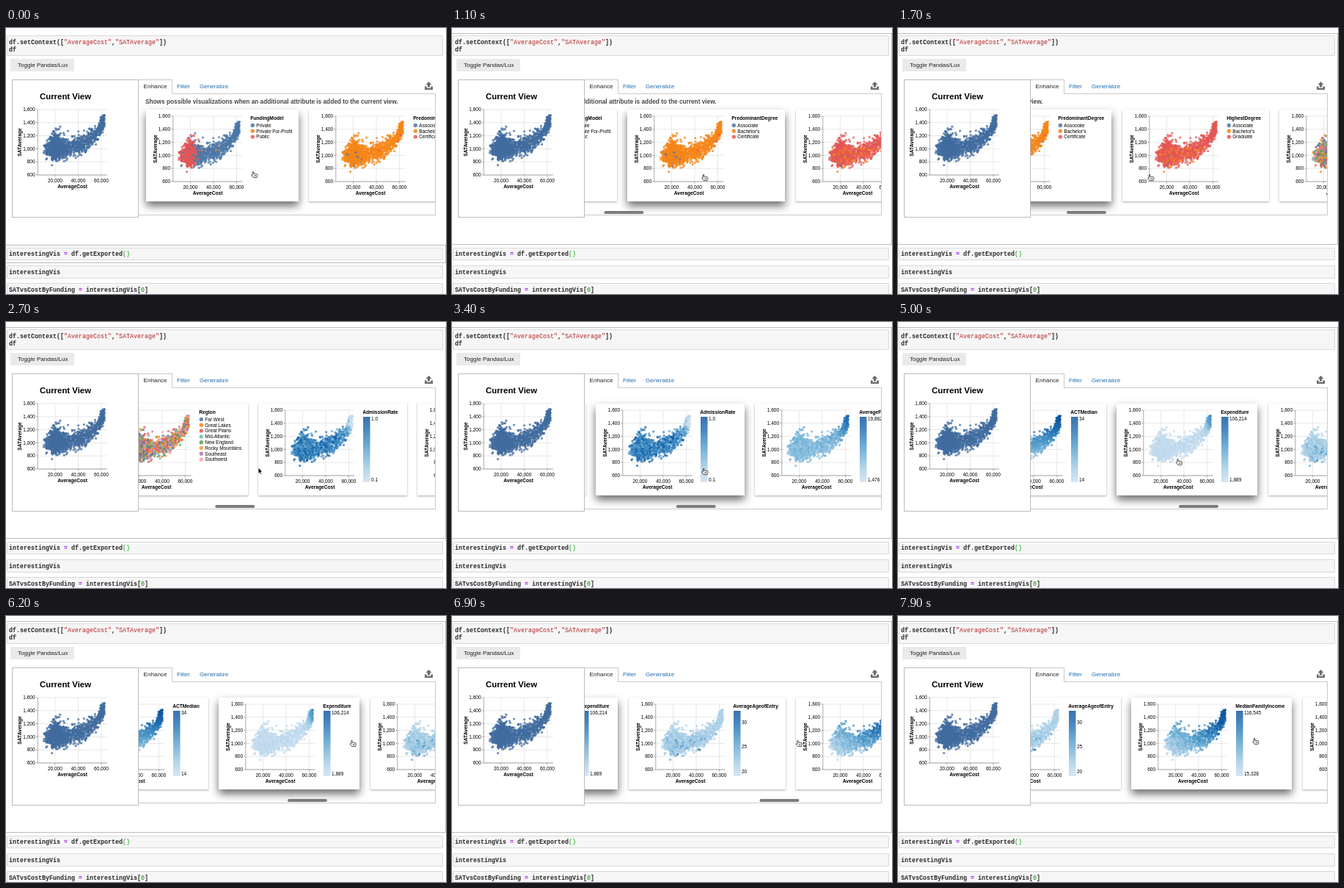
Recreate the animation shown at these times as an HTML page with a canvas. Size 600x362 px, loop 8 s.

```html
<!DOCTYPE html>
<html lang="en">
<head>
<meta charset="utf-8">
<title>Notebook visualizations</title>
<style>
  html, body { margin: 0; width: 100%; height: 100%; overflow: hidden; background: #fff; }
  body { position: relative; font-family: "Liberation Sans", Arial, sans-serif; }
  div, svg, canvas { position: absolute; box-sizing: border-box; }
  svg { left: 0; top: 0; overflow: visible; }
  .code { left: 1px; width: 595px; background: #f6f6f6; border: 1px solid #dadada; border-radius: 1px; }
  .select { left: -3px; width: 603px; border: 1px solid #bcbcbc; }
  .mono { font: bold 8.33px "Liberation Mono", "Courier New", monospace; white-space: pre; fill: #262626; }
  .str, .num, .par { font-weight: normal; }
  .str { fill: #b52323; }
  .op { fill: #a2f; }
  .num { fill: #080; }
  .par { fill: #0a0; }
  .button { left: 6px; top: 42px; width: 87px; height: 17px; background: #eaeaea; }
  .view { left: 8px; top: 70px; width: 173px; height: 187.5px; background: #fff; border: 1px solid #bcbcbc; }
  .list { left: 181px; top: 89px; width: 405px; height: 166px; border: 1px solid #cacaca; border-left: 0; overflow: hidden; }
  .strip { left: -181px; top: -90px; }
  .tab { left: 181px; top: 70px; width: 46px; height: 20px; background: #fff; border: 1px solid #cacaca; border-width: 1px 1px 0 0; }
  .card { top: 111px; height: 125px; background: #fff; overflow: visible; }
  .thumb { left: 0; top: 249px; width: 54px; height: 4px; border-radius: 2px; background: #7c7c7c; }
  .tick { font-size: 6.5px; fill: #000; }
  .bold { font-size: 6.65px; font-weight: bold; fill: #000; }
  .mid { text-anchor: middle; }
  .end { text-anchor: end; }
  .tabs { font-size: 8.1px; fill: #1f6cb0; }
</style>
</head>
<body>
<div class="select" id="select"></div>
<div class="code" style="top:10px;height:28px"></div>
<div class="code" style="top:299px;height:17px"></div>
<div class="code" style="top:323px;height:18px"></div>
<div class="code" style="top:347px;height:18px"></div>
<div class="button"></div>
<div class="list"><div class="strip" id="strip">
  <svg width="1" height="1"><text x="190" y="103" font-size="8.27" font-weight="bold" fill="#484848">Shows possible visualizations when an additional attribute is added to the current view.</text></svg>
</div></div>
<div class="tab"></div>
<div class="view"></div>
<div id="current" style="left:0;top:0"></div>
<svg width="600" height="362">
  <g class="mono">
    <text x="4" y="22">df.setContext([<tspan class="str">"AverageCost"</tspan>,<tspan class="str">"SATAverage"</tspan>])</text>
    <text x="4" y="32">df</text>
    <text x="4" y="310">interestingVis <tspan class="op">=</tspan> df.getExported<tspan class="par">()</tspan></text>
    <text x="4" y="335">interestingVis</text>
    <text x="4" y="359">SATvsCostByFunding <tspan class="op">=</tspan> interestingVis[<tspan class="num">0</tspan>]</text>
  </g>
  <text x="16" y="53" font-size="8.05" fill="#222">Toggle Pandas/Lux</text>
  <text x="46" y="97" font-size="11.4" font-weight="bold">Current View</text>
  <g class="tabs">
    <text x="187.5" y="82" fill="#222">Enhance</text>
    <text x="233" y="82">Filter</text>
    <text x="264" y="82">Generalize</text>
  </g>
  <path d="M576.5 73l4 4.3h-2.4v3.2h-3.2v-3.2h-2.4zM571 79.5h2.6v2.2h5.8v-2.2h2.6v4.5h-11z" fill="#6b6b6b"/>
</svg>
<div class="thumb" id="thumb"></div>
<svg width="600" height="362">
  <g id="cursor" stroke-linejoin="round" stroke-width=".8">
    <path id="hand" fill="#fff" stroke="#222" d="M-2.2 1V-3.2Q-1.5-4.4-.8-3.2V-.8L1-.6 2.6-.3 4-.1Q4.6.3 4.4 1.5L3.5 4.6H-1.2L-3.8 1.4Q-3.9.3-2.2 1zM.4 1.2v1.8M2 1.2v1.8"/>
    <path id="arrow" fill="#000" stroke="#fff" d="M-.5-5V3.4L1.3 1.8 2.5 4.6 4 4 2.8 1.2H5.2z"/>
  </g>
</svg>
<script>
const LOOP = 8000, STEP = 100, W = 94.5, H = 89;
const $ = id => document.getElementById(id);
const clamp = (v, lo = 0, hi = 1) => Math.min(hi, Math.max(lo, v));

// Seeded random numbers
let seed = 20;
function rand() {
  seed = (seed + 0x6d2b79f5) | 0;
  let z = Math.imul(seed ^ (seed >>> 15), 1 | seed);
  z = (z + Math.imul(z ^ (z >>> 7), 61 | z)) ^ z;
  return ((z ^ (z >>> 14)) >>> 0) / 4294967296;
}
const gauss = () => Math.sqrt(-2 * Math.log(1 - rand())) * Math.cos(6.2832 * rand());

// Colleges: cost in thousands, test score, two random traits
const colleges = Array.from({ length: 1250 }, () => {
  let cost, sat;
  if (rand() < 0.4) {
    cost = clamp(20 + 4 * gauss(), 10 + 3 * rand(), 63);
    const u = clamp((cost - 9) / 10);
    sat = 955 + 85 * u + (50 + 48 * u) * gauss();
  } else {
    cost = rand() < 0.1 ? 60.5 + 1.5 * gauss() : 17 + 45 * rand();
    const u = clamp((cost - 20) / 42);
    sat = 1012 + 415 * u ** 3.5 + (80 - 18 * u) * gauss();
  }
  return { cost: clamp(cost, 9, 63), sat: clamp(sat, 670, 1500 + 35 * rand()), r: rand(), g: gauss() };
});

const PALETTE = ['#4c78a8', '#f58518', '#e45756', '#72b7b2', '#54a24b', '#f99a38', '#b279a2', '#ff9da6'];
const BLUES = [[207, 225, 242], [168, 206, 229], [116, 178, 215], [69, 146, 198], [32, 111, 178], [14, 84, 156]];
function blue(v) {
  const p = clamp(v) * 4.999, i = Math.floor(p);
  return `rgb(${BLUES[i].map((a, k) => Math.round(a + (BLUES[i + 1][k] - a) * (p - i)))})`;
}
const score = p => (p.sat - 700) / 800;
const rich = p => clamp((p.cost - 44) / 19) ** 2 * clamp((p.sat - 1050) / 350);

const funding = p => p.r > 0.975 && p.cost > 17 && p.cost < 46 ? 1
  : p.cost + 2.5 * p.g < 25.5 && p.r < 0.91 ? 2 : 0;
const predominant = p => p.r < 0.04 && p.cost < 34 && p.sat < 1060 ? 0 : p.r > 0.99 ? 2 : 1;
const highest = p => p.r < 0.06 && p.cost < 24 && p.sat < 1000 ? 0
  : p.r < 0.2 && p.sat < 1120 ? 1 : 2;
const degrees = last => ['Associate', "Bachelor's", last];

const cards = [
  { x: 190.5, w: 208, title: 'FundingModel', items: ['Private', 'Private For-Profit', 'Public'], f: funding },
  { x: 413, w: 215, title: 'PredominantDegree', items: degrees('Certificate'), f: predominant },
  { x: 643, w: 200, title: 'HighestDegree', items: degrees('Graduate'), f: highest },
  { x: 857, w: 209, title: 'Region', f: p => Math.floor(p.r * 8),
    items: ['Far West', 'Great Lakes', 'Great Plains', 'Mid-Atlantic', 'New England', 'Rocky Mountains', 'Southeast', 'Southwest'] },
  { x: 1080, w: 203, title: 'AdmissionRate', ticks: [['1.0', 21], ['0.1', 104]],
    f: p => 0.7 + 0.19 * p.g - 0.75 * rich(p) },
  { x: 1296.5, w: 223, title: 'AverageFacultySalary', ticks: [['19,862', 21], ['1,476', 104]],
    f: p => 0.34 + 0.08 * p.g + 0.45 * rich(p) + 0.15 * (score(p) - 0.4) },
  { x: 1534, w: 191, title: 'ACTMedian', ticks: [['34', 21], ['14', 104]],
    f: p => 0.08 + 0.95 * score(p) },
  { x: 1739, w: 192, title: 'Expenditure', ticks: [['106,214', 21], ['1,889', 104]],
    f: p => 0.07 + 0.035 * p.g + 0.62 * rich(p) ** 2 },
  { x: 1946, w: 214, title: 'AverageAgeofEntry', ticks: [['30', 34], ['25', 67], ['20', 101]],
    f: p => 0.17 + (p.r < 0.35 ? 0.3 * Math.abs(p.g) * clamp((1200 - p.sat) / 200) : 0.05 * p.g) },
  { x: 2174, w: 219, title: 'MedianFamilyIncome', ticks: [['116,545', 21], ['15,328', 104]],
    f: p => 0.08 + 0.62 * score(p) + (p.cost - 25) / 100 + 0.1 * p.g },
  { x: 2408, w: 215, title: 'AverageDebt', ticks: [['30,000', 21], ['5,000', 104]],
    f: p => 0.4 + 0.2 * p.g }
];

const text = (x, y, s, cls) => `<text x="${x}" y="${y}" class="${cls}">${s}</text>`;
const line = (x1, y1, x2, y2, c) => `<path d="M${x1} ${y1}L${x2} ${y2}" stroke="${c}" stroke-width=".7"/>`;

function addPlot(box, x, y, color, legend = '') {
  let grid = '', labels = '';
  for (let i = 0; i < 6; i++) {
    const ty = y + i * H / 5;
    grid += line(x, ty, x + W, ty, '#ddd') + line(x - 2.5, ty, x, ty, '#888');
    labels += text(x - 3.7, ty + 2.2, (1600 - 200 * i).toLocaleString('en-US'), 'tick end');
  }
  for (const k of [20, 40, 60]) {
    const tx = x + (k - 5) / 60 * W;
    grid += line(tx, y, tx, y + H, '#ddd') + line(tx, y + H, tx, y + H + 2.5, '#888');
    labels += text(tx, y + H + 9.8, k + ',000', 'tick mid');
  }
  grid += line(x, y, x, y + H, '#888') + line(x, y + H, x + W, y + H, '#888');
  labels += text(x + W / 2, y + H + 17.8, 'AverageCost', 'bold mid')
    + `<text transform="translate(${x - 22} ${y + H / 2})rotate(-90)" class="bold mid">SATAverage</text>`;
  box.insertAdjacentHTML('beforeend', `<svg width="1" height="1">${grid}${labels}${legend}</svg>`);

  const cv = document.createElement('canvas'), ratio = window.devicePixelRatio || 1;
  cv.width = 100 * ratio;
  cv.height = 94 * ratio;
  cv.style.cssText = `left:${x - 2}px;top:${y - 2}px;width:100px;height:94px`;
  const ctx = cv.getContext('2d');
  ctx.scale(ratio, ratio);
  ctx.globalAlpha = 0.75;
  for (const p of colleges) {
    ctx.fillStyle = color(p);
    ctx.beginPath();
    ctx.arc(2 + (p.cost - 5) / 60 * W, 2 + (1600 - p.sat) / 1000 * H, 1.65, 0, 7);
    ctx.fill();
  }
  box.append(cv);
}

function legendOf(c) {
  let out = text(142.2, 14.3, c.title, 'bold');
  if (c.items) {
    c.items.forEach((s, i) => {
      const y = 21.5 + i * 7.8;
      out += `<circle cx="145.3" cy="${y}" r="2.7" fill="${PALETTE[i]}" opacity=".85"/>` + text(150.3, y + 2.2, s, 'tick');
    });
  } else {
    out += '<rect x="143" y="18" width="9.5" height="89" fill="url(#ramp)" opacity=".82"/>';
    for (const [s, y] of c.ticks) out += text(154, y + 2.2, s, 'tick');
  }
  return out;
}

$('strip').insertAdjacentHTML('afterbegin', '<svg width="1" height="1"><linearGradient id="ramp" x1="0" y1="1" x2="0" y2="0">'
  + BLUES.map((c, i) => `<stop offset="${i / 5}" stop-color="rgb(${c})"/>`).join('') + '</linearGradient></svg>');
addPlot($('current'), 43.3, 111, () => '#426c9f');
for (const c of cards) {
  c.el = document.createElement('div');
  c.el.className = 'card';
  c.el.style.left = c.x + 'px';
  c.el.style.width = c.w + 'px';
  addPlot(c.el, 36.8, 9, c.items ? p => PALETTE[c.f(p)] : p => blue(c.f(p)), legendOf(c));
  $('strip').append(c.el);
}

// Smooth monotone curve through [time, value] points
function curve(pts) {
  const n = pts.length - 1;
  const d = i => (pts[i + 1][1] - pts[i][1]) / (pts[i + 1][0] - pts[i][0]);
  const m = pts.map((_, i) => {
    if (i === 0 || i === n) return 0;
    const a = d(i - 1), b = d(i);
    return a * b > 0 ? 2 * a * b / (a + b) : 0;
  });
  return t => {
    if (t >= pts[n][0]) return pts[n][1];
    let i = 0;
    while (t >= pts[i + 1][0]) i++;
    const h = pts[i + 1][0] - pts[i][0], u = (t - pts[i][0]) / h, v = 1 - u;
    return v * v * (1 + 2 * u) * pts[i][1] + u * u * (3 - 2 * u) * pts[i + 1][1]
      + h * u * v * (v * m[i] - u * m[i + 1]);
  };
}
const scroll = curve([[0, 0], [500, 0], [900, 140], [1350, 215], [1700, 337], [2200, 560], [2700, 736],
  [3100, 868], [3400, 884], [3700, 884], [4200, 1150], [4700, 1400], [5000, 1441], [6100, 1441],
  [6900, 1705], [7300, 1840], [7500, 1856]]);
const cursorX = curve([[0, 338.5], [300, 338.5], [800, 344.5], [3700, 344.5], [4600, 383], [5400, 383], [5800, 473], [6900, 473], [7400, 487.5]]);
const cursorY = curve([[0, 199], [300, 199], [800, 203], [3700, 203], [4600, 190], [5400, 190], [5800, 173], [6900, 173], [7400, 170]]);
const hovers = [[-900, 0], [900, 1], [1800, 2], [2100, 3], [2500, -1], [2900, 4], [4000, 5], [4400, 6], [4700, 7], [7000, 9]];

function shade(el, k) {
  el.style.boxShadow = `0 ${1 + 5 * k}px ${2.5 + 8.5 * k}px rgba(0,0,0,${0.34 + 0.24 * k})`;
  el.style.zIndex = k > 0 ? 1 : 0;
}

function draw(t) {
  const s = Math.round(scroll(t));
  $('strip').style.transform = `translateX(${-s}px)`;
  $('thumb').style.transform = `translateX(${183.3 + s * 0.1385}px)`;
  $('thumb').style.opacity = (t >= 500 && t < 5400) || (t >= 6100 && t < 7900) ? 1 : 0;

  const i = hovers.findLastIndex(h => t >= h[0]);
  const k = clamp((t - hovers[i][0] + STEP) / 300);
  cards.forEach((c, n) => shade(c.el, n === hovers[i][1] ? k : i && n === hovers[i - 1][1] ? 1 - k : 0));

  const first = t >= 500;
  $('select').style.top = first ? '7px' : '295px';
  $('select').style.height = first ? '288px' : '25px';

  const arrow = t >= 2500 && t < 2900;
  $('hand').style.display = arrow ? 'none' : '';
  $('arrow').style.display = arrow ? '' : 'none';
  $('cursor').setAttribute('transform', `translate(${cursorX(t)} ${cursorY(t)})`);
}

const start = performance.now();
function tick() {
  const t = (performance.now() - start) % LOOP;
  draw(Math.floor(t / STEP) * STEP);
  requestAnimationFrame(tick);
}
tick();
</script>
</body>
</html>
```
